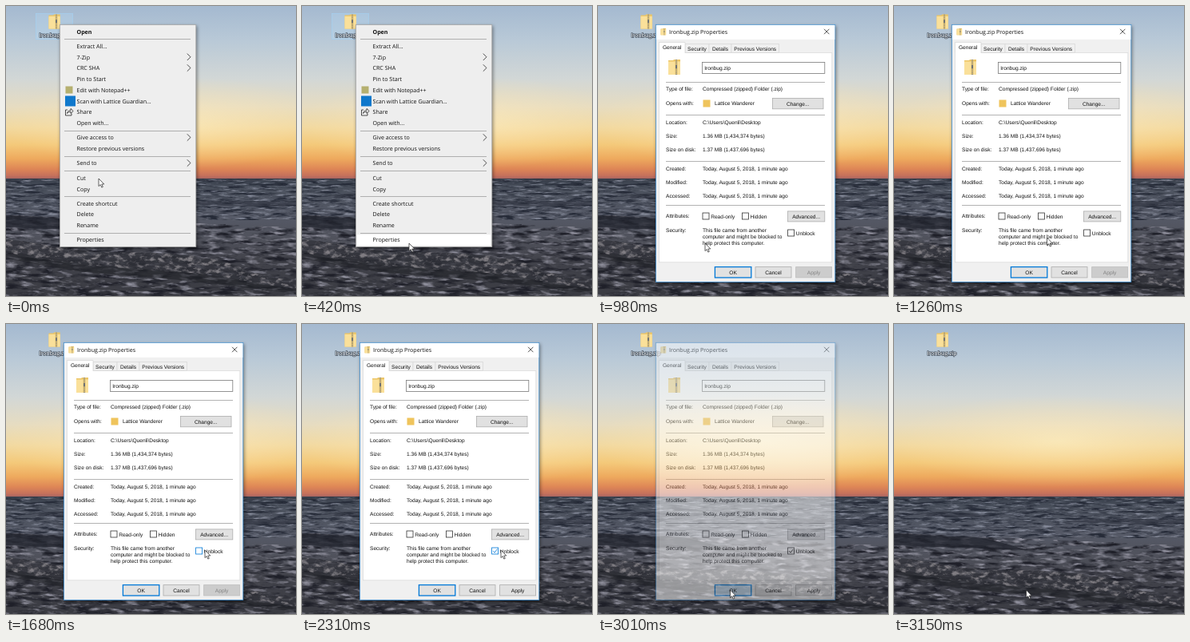
An HTML page for the animation above (3.22 s loop, 363 px wide and 363 px high).

```html
<!DOCTYPE html>
<html lang="en">
<head>
<meta charset="utf-8">
<title>Unblocking a zip file</title>
<style>
  html, body { margin: 0; width: 100%; height: 100%; overflow: hidden; background: #444b57; }
  svg { display: block; width: 100vw; height: 100vh; }
  text { font: 6.6px "Liberation Sans", Arial, sans-serif; fill: #111; white-space: pre; text-rendering: geometricPrecision; }
  .ui { font: 7.08px "Open Sans", "Noto Sans", sans-serif; }
  .bold { font-weight: 700; }
  .mid { text-anchor: middle; }
  .label { fill: #fff; stroke: #1b2430; stroke-width: 1.3px; stroke-opacity: .75; paint-order: stroke; }
  .line { fill: none; stroke: #222; stroke-width: .8; }
  .window { filter: drop-shadow(1.5px 2px 2px rgba(0, 0, 0, .45)); }
</style>
</head>
<body>
<svg id="stage" viewBox="0 0 363 363" xmlns="http://www.w3.org/2000/svg"></svg>
<script>
const STEP = 70, LOOP = 3220;
const MENU_END = 840, DIALOG_START = 980, CHECK_TIME = 2030, PRESS_TIME = 2870, CLOSE_TIME = 3010;

const text = (x, y, s, cls = '', extra = '') =>
  `<text x="${x}" y="${y + 2.4}" class="${cls}" ${extra}>${s}</text>`;
const rect = (x, y, w, h, fill, stroke = 'none', extra = '') =>
  `<rect x="${x}" y="${y}" width="${w}" height="${h}" fill="${fill}" stroke="${stroke}" stroke-width=".8" ${extra}/>`;
const rule = (x1, x2, y, color) => `<path d="M${x1} ${y}H${x2}" stroke="${color}" stroke-width=".8"/>`;
const stops = list => list.map(([offset, color, opacity = 1]) =>
  `<stop offset="${offset}" stop-color="${color}" stop-opacity="${opacity}"/>`).join('');
const gradient = (id, list) => `<linearGradient id="${id}" x2="0" y2="1">${stops(list)}</linearGradient>`;

// Stretched noise tinted with one colour (r, g, b in 0..1)
const ripple = (id, freq, seed, [r, g, b], gain, cut) => `
  <filter id="${id}" x="0" y="0" width="1" height="1" color-interpolation-filters="sRGB">
    <feTurbulence type="fractalNoise" baseFrequency="${freq}" numOctaves="4" seed="${seed}"/>
    <feColorMatrix values="0 0 0 0 ${r} 0 0 0 0 ${g} 0 0 0 0 ${b} ${gain} 0 0 0 ${cut}"/>
  </filter>`;

const zipFolder = (x, y, s) => `
  <g transform="translate(${x} ${y}) scale(${s})">
    <path d="M0 1H6L7 0H15V19H0Z" fill="#ecc566"/>
    <path d="M0 2.5H15V19H0Z" fill="#fae09a"/>
    <path d="M8.5 0H11.5V19H8.5Z" fill="#e3c475"/>
    <path d="M10 0V19" stroke="#777" stroke-width="1.3" stroke-dasharray="1 .8"/>
    <path d="M9 7H11V11H9Z" fill="#6d7175"/>
  </g>`;

function background() {
  const patch = (y, h, filter, skew = 0) =>
    rect(0, y, 363, h, '#000', 'none', `filter="url(#${filter})" transform="skewY(${skew})"`);
  return `<defs>
    ${gradient('sky', [[0, '#a4b9d0'], [.2, '#b9c9d7'], [.42, '#d2d7d6'], [.58, '#e6dcc1'], [.7, '#f2d9a0'],
      [.8, '#f4c97a'], [.88, '#eeaa5e'], [.94, '#de8656'], [.98, '#c4705c'], [1, '#a06263']])}
    <radialGradient id="glow">${stops([[0, '#fff0c4', .6], [.5, '#ffeabb', .3], [1, '#ffe6b0', 0]])}</radialGradient>
    ${gradient('sea', [[0, '#3a414d'], [.1, '#4b515d'], [.32, '#555966'], [.5, '#50525c'], [.7, '#41424a'], [1, '#3a3b42']])}
    ${ripple('farDark', '.045 .35', 3, [.15, .17, .22], 3.6, -1.6)}
    ${ripple('farLight', '.06 .4', 8, [.53, .55, .61], 3.2, -1.7)}
    ${ripple('nearDark', '.045 .22', 5, [.12, .125, .16], 3.6, -1.6)}
    ${ripple('nearLight', '.06 .28', 14, [.56, .56, .61], 3.4, -1.75)}
    ${ripple('foam', '.11 .2', 21, [.5, .49, .51], 3.6, -1.75)}
    <clipPath id="surf"><path d="M0 292C45 296 85 309 140 308C200 308 265 312 300 330C325 340 345 342 363 343V354C320 348 285 342 255 336C190 330 130 328 90 323C55 318 25 314 0 308Z"/></clipPath>
  </defs>
  ${rect(0, 0, 363, 217, 'url(#sky)')}
  <ellipse cx="205" cy="146" rx="210" ry="58" fill="url(#glow)"/>
  ${rect(0, 216, 363, 147, 'url(#sea)')}
  ${patch(216, 52, 'farDark')}${patch(217, 51, 'farLight')}
  ${patch(262, 101, 'nearDark', 2.5)}${patch(262, 101, 'nearLight', 2.5)}
  <path d="M0 262C35 262 60 267 92 266C120 268 145 276 165 283C115 281 70 280 0 277Z" fill="#20232c" opacity=".75"/>
  <path d="M215 247C270 241 320 246 363 244V250C310 253 260 249 215 247ZM25 238C60 233 85 235 120 240C85 243 50 242 25 238Z" fill="#282d38" opacity=".5"/>
  <path d="M0 306C60 316 110 326 175 329C240 332 300 344 363 354V360C290 352 210 340 120 335C70 331 30 321 0 316Z" fill="#222329" opacity=".6"/>
  <g clip-path="url(#surf)">${rect(0, 288, 363, 70, '#303138', 'none', 'opacity=".7"')}${patch(288, 70, 'foam')}</g>`;
}

const desktopIcon = `
  <g id="selection">${rect(37.4, 9.4, 46, 32, '#b5daf5', '#a5cfee', 'fill-opacity=".3"')}</g>
  ${zipFolder(53.5, 10.5, .95)}
  ${text(60, 37, 'Ironbug.zip', 'ui mid label')}`;

// Context menu: [centre y, caption, has submenu]
const menuItems = [
  [32.5, 'Open'], [50.5, 'Extract All...'], [64.3, '7-Zip', true], [78, 'CRC SHA', true], [91.7, 'Pin to Start'],
  [105.4, 'Edit with Notepad++'], [119.2, 'Scan with Lattice Guardian...'], [133, 'Share'], [146.7, 'Open with...'],
  [165, 'Give access to', true], [179, 'Restore previous versions'], [197, 'Send to', true], [215.3, 'Cut'],
  [229.2, 'Copy'], [247.3, 'Create shortcut'], [261, 'Delete'], [274.8, 'Rename'], [293, 'Properties']
];
const menu = `
  <g id="menu">
    <g class="window">${rect(67.4, 23.4, 170.4, 278, '#eeeeee', '#a5a5a5')}</g>
    ${rect(69, 0, 167, 13.6, '#fff', 'none', 'id="hover"')}
    ${[41.5, 156.5, 188.5, 206.5, 238.5, 284.5].map(y => rule(73, 231, y, '#a0a0a0')).join('')}
    ${menuItems.map(([y, s, sub], i) => text(88.5, y, s, i ? 'ui' : 'ui bold') +
      (sub ? `<path class="line" d="M226.8 ${y - 4.7}l4.2 4.2l-4.2 4.2"/>` : '')).join('')}
    ${rect(74.5, 100.5, 9, 9, '#b5b070')}
    ${rect(74, 112.5, 13, 13, '#0f78cc')}
    <path class="line" d="M77 130H74.5V137H82V134.5M76.5 134.5C77 131.5 79 130.6 81 130.6V128.4L84.2 131.5L81 134.5V132.4C79 132.4 77.5 133 76.5 134.5Z"/>
  </g>
  <g id="fadingItem">${rect(68.5, 286, 168, 14, '#e6e6e6')}${text(88.5, 293, 'Properties', 'ui')}</g>`;

function dialog() {
  const button = (x, y, w, h, s, id) =>
    rect(x + .4, y + .4, w, h, '#e1e1e1', '#adadad', id ? `id="${id}"` : '') +
    text(x + w / 2 + .4, y + h / 2 + .4, s, 'mid', id ? `id="${id}Text"` : '');
  const checkbox = (x, y, s, id = '') => rect(x, y, 8, 8, '#fff', '#333', id && `id="${id}"`) + text(x + 10.2, y + 4.2, s);
  const tab = (x, w, s) => rect(x, 47.4, w, 11, '#f0f0f0', '#d9d9d9') + text(x + w / 2, 53.2, s, 'mid');
  const rows = [
    [104, 'Type of file:', 'Compressed (zipped) Folder (.zip)'],
    [121.5, 'Opens with:', ''],
    [146, 'Location:', 'C:\\Users\\Quenli\\Desktop'],
    [162.5, 'Size:', '1.36 MB (1,434,374 bytes)'],
    [179.5, 'Size on disk:', '1.37 MB (1,437,696 bytes)'],
    [204, 'Created:', 'Today, August 5, 2018, 1 minute ago'],
    [221, 'Modified:', 'Today, August 5, 2018, 1 minute ago'],
    [237.5, 'Accessed:', 'Today, August 5, 2018, 1 minute ago'],
    [262.5, 'Attributes:', ''],
    [280.5, 'Security:', 'This file came from another'],
    [288.7, '', 'computer and might be blocked to'],
    [296.9, '', 'help protect this computer.']
  ];
  return `<g id="dialog">
    <g class="window">${rect(72.4, 23.4, 224.4, 322, '#f0f0f0', '#3f8fd2')}</g>
    ${rect(72.9, 23.9, 223.4, 18, '#fff')}
    ${zipFolder(78.5, 28, .44)}
    ${text(89, 32.5, 'Ironbug.zip Properties', 'ui')}
    <path class="line" d="M283 28.8l6.4 6.4m0-6.4l-6.4 6.4"/>
    ${rect(76.4, 58.4, 216.4, 262.4, '#fff', '#dcdcdc')}
    ${tab(109, 30, 'Security')}${tab(139, 28, 'Details')}${tab(167, 59.5, 'Previous Versions')}
    <path d="M76.4 58.9V45.4H109V58.9" fill="#fff" stroke="#d9d9d9" stroke-width=".8"/>
    ${text(92.7, 52, 'General', 'mid')}
    ${zipFolder(88, 67, 1)}
    ${rect(130.4, 70.4, 153.4, 14, '#fff', '#7a7a7a')}${text(133.2, 77.3, 'Ironbug.zip')}
    ${[95.5, 136.5, 194.5, 249.5].map(y => rule(85, 284, y, '#a0a0a0')).join('')}
    ${rows.map(([y, name, value]) => text(85, y, name) + text(131, y, value)).join('')}
    ${rect(131.5, 117.5, 9, 9, '#efc45c')}${text(146, 121.5, 'Lattice Wanderer')}
    ${button(218, 115, 63.6, 13.4, 'Change...')}
    ${checkbox(131, 259, 'Read-only')}${checkbox(180.4, 259, 'Hidden')}
    ${button(237, 256.5, 46.4, 13, 'Advanced...')}
    ${checkbox(237.6, 280, 'Unblock', 'unblock')}
    <path id="tick" class="line" d="M239.2 284.2l1.9 2l3.2-4.4"/>
    ${button(146, 326.2, 45.4, 13.4, 'OK', 'ok')}
    ${button(196.6, 326.2, 45, 13.4, 'Cancel')}
    ${button(247.2, 326.2, 45, 13.4, 'Apply', 'apply')}
  </g>`;
}

const pointer = `<path id="pointer" d="M0 0V9.6L2.2 7.6L3.8 11.1L5.3 10.4L3.8 7H6.8Z" fill="#fff" stroke="#222" stroke-width=".7"/>`;

const $ = id => document.getElementById(id);
$('stage').innerHTML = background() + desktopIcon + menu + dialog() + pointer;

const set = (id, attrs) => { for (const k in attrs) $(id).setAttribute(k, attrs[k]); };
const show = (id, opacity) => set(id, { opacity: +opacity, visibility: opacity ? 'visible' : 'hidden' });

// Pointer moves: [start, end, x, y]
const moves = [[0, 420, 134, 297], [980, 1540, 249, 283], [2310, 2800, 165.5, 333]];
function pointerAt(t) {
  let x = 116, y = 216;
  for (const [start, end, toX, toY] of moves) {
    const p = Math.min(1, Math.max(0, (t - start) / (end - start)));
    const k = p * p * (3 - 2 * p);
    x += (toX - x) * k;
    y += (toY - y) * k;
  }
  return [x, y];
}

function render(t) {
  const [x, y] = pointerAt(t);
  const over = (l, top, r, b) => x >= l && x <= r && y >= top && y <= b;
  set('pointer', { transform: `translate(${x} ${y})` });

  const menuOpen = t < MENU_END;
  show('menu', menuOpen);
  show('selection', menuOpen);
  const hovered = t > 0 && menuItems.find(([cy]) => Math.abs(cy - y) < 7);
  show('hover', menuOpen && !!hovered);
  if (hovered) set('hover', { y: hovered[0] - 6.8 });
  show('fadingItem', menuOpen || t >= DIALOG_START ? 0 : t < MENU_END + STEP ? .55 : .25);

  const closing = (t - CLOSE_TIME) / STEP;
  show('dialog', t < DIALOG_START || closing >= 2 ? 0 : closing < 0 ? 1 : closing < 1 ? .55 : .15);

  const checked = t >= CHECK_TIME;
  show('tick', t >= DIALOG_START && closing < 2 && checked);
  const overBox = over(237, 279, 272, 289);
  set('unblock', { stroke: overBox ? '#0078d7' : '#333' });
  $('tick').style.stroke = overBox ? '#0078d7' : '#222';
  set('apply', { fill: checked ? '#e1e1e1' : '#cccccc', stroke: checked ? '#adadad' : '#bfbfbf' });
  $('applyText').style.fill = checked ? '#111' : '#838383';
  const overOk = over(146, 326, 192, 340);
  set('ok', { fill: t >= PRESS_TIME ? '#cce4f7' : overOk ? '#e5f1fb' : '#e1e1e1', stroke: '#0078d7', 'stroke-width': 1.3 });
}

let shown = -1;
function frame() {
  const t = Math.floor(performance.now() % LOOP / STEP) * STEP;
  if (t !== shown) render(shown = t);
  requestAnimationFrame(frame);
}
frame();
</script>
</body>
</html>
```
